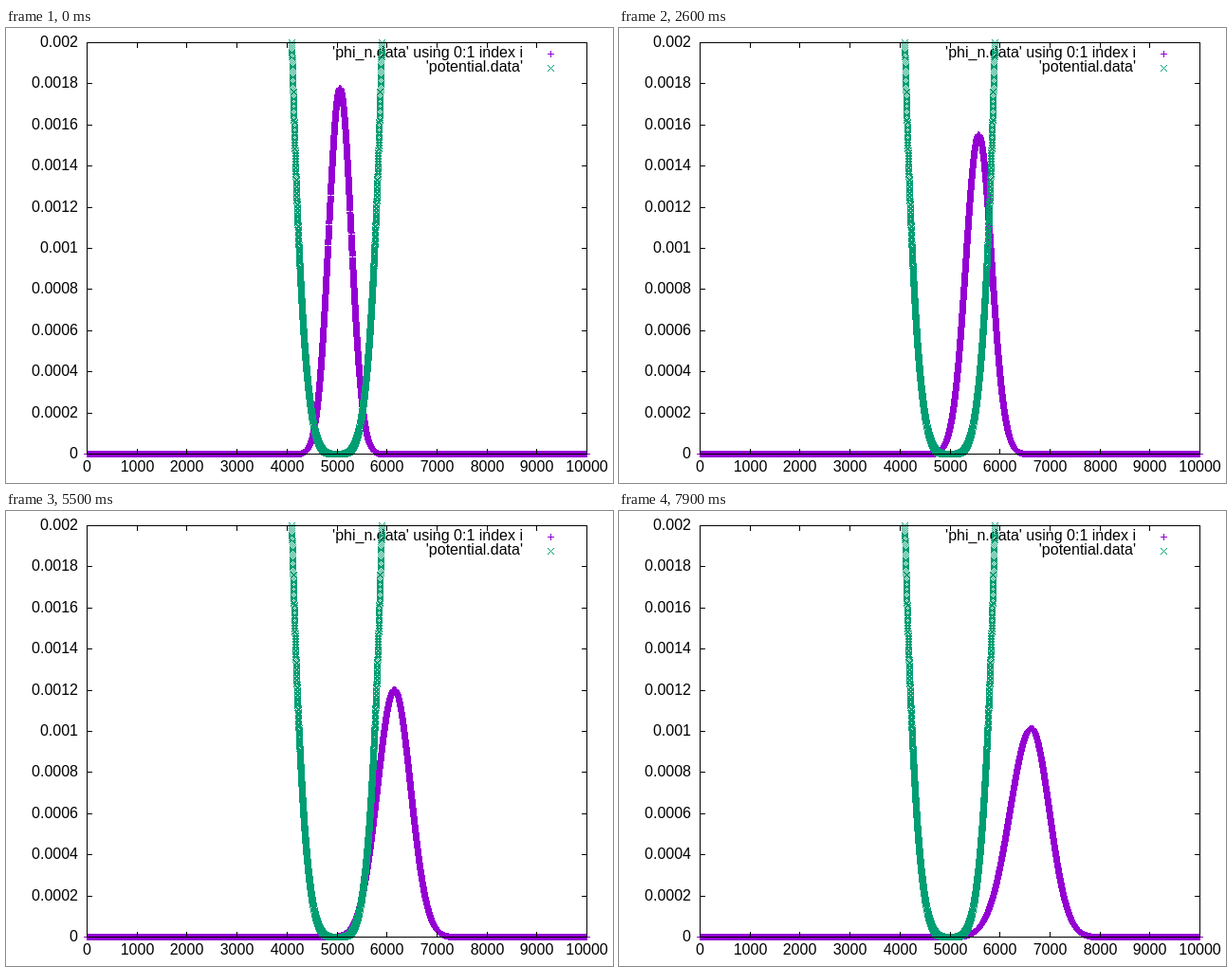
Write an HTML page with a canvas that moves like this. It is 640x480 px and loops after 8000 ms.

```html
<!DOCTYPE html>
<html lang="en">
<head>
<meta charset="utf-8">
<title>Wave packet and potential</title>
<style>
  html, body { margin: 0; width: 100%; height: 100%; overflow: hidden; background: #fff; }
  svg, canvas { position: absolute; left: 0; top: 0; width: 640px; height: 480px; }
  text { font: 16px "Liberation Sans", Arial, sans-serif; fill: #000; }
  rect { shape-rendering: crispEdges; }
</style>
</head>
<body>
<svg viewBox="0 0 640 480">
  <text x="545" y="31" text-anchor="end">'phi_n.data' using 0:1 index i</text>
  <text x="545" y="46" text-anchor="end">'potential.data'</text>
</svg>
<canvas id="plot" width="640" height="480"></canvas>
<svg id="axes" viewBox="0 0 640 480"></svg>
<script>
const LEFT = 85, RIGHT = 612, TOP = 15, BASE = 449;
const COUNT = 10000, HEIGHT = BASE - TOP, SCALE = (RIGHT - LEFT) / COUNT;
const LOOP = 8000, STEP = 100;

// Peak height in pixels every 900 ms, with one extra value at each end.
const PEAKS = [386.8, 386.5, 377.5, 358.5, 334.5, 309.5, 285.5, 263.5, 245.5, 230.5, 218, 208];
const AREA = 4561;

function addAxes() {
  const parts = [];
  const bar = (x, y, w, h) => parts.push(`<rect x="${x}" y="${y}" width="${w}" height="${h}"/>`);
  const label = (x, y, anchor, value) =>
    parts.push(`<text x="${x}" y="${y}" text-anchor="${anchor}">${value}</text>`);
  const width = RIGHT - LEFT + 1, height = HEIGHT + 1;
  bar(LEFT, TOP, width, 1);
  bar(LEFT, BASE, width, 1);
  bar(LEFT, TOP, 1, height);
  bar(RIGHT, TOP, 1, height);
  for (let k = 0; k <= 10; k++) {
    const x = Math.round(LEFT + k * 1000 * SCALE);
    const y = Math.round(BASE - k * HEIGHT / 10);
    bar(x, TOP, 1, 6);
    bar(x, BASE - 5, 1, 6);
    bar(LEFT, y, 6, 1);
    bar(RIGHT - 5, y, 6, 1);
    label(x + 0.5, 468, "middle", k * 1000);
    label(76, y + 5, "end", +(k * 0.0002).toFixed(4));
  }
  document.getElementById("axes").innerHTML = parts.join("");
}

function plus(ctx, x, y) {
  ctx.fillRect(x - 3, y, 7, 1);
  ctx.fillRect(x, y - 3, 1, 7);
}

function cross(ctx, x, y) {
  for (let k = -3; k <= 3; k++) {
    ctx.fillRect(x + k, y + k, 1, 1);
    ctx.fillRect(x + k, y - k, 1, 1);
  }
}

function plotPoints(ctx, mark, from, to, rise) {
  let lastX, lastY;
  for (let i = from; i <= to; i++) {
    const x = Math.round(LEFT + i * SCALE), y = BASE - rise(i);
    if (x !== lastX || y !== lastY) mark(ctx, x, y);
    lastX = x;
    lastY = y;
  }
}

function makePotential() {
  const layer = document.createElement("canvas");
  layer.width = 640;
  layer.height = 480;
  const ctx = layer.getContext("2d");
  ctx.fillStyle = "#009e73";
  cross(ctx, 574, 42);
  plotPoints(ctx, cross, 4100, 5900, i => Math.round(HEIGHT * ((i - 5000) / 900) ** 4));
  return layer;
}

function peakAt(u) {
  const n = Math.floor(u), f = u - n;
  const [a, b, c, d] = PEAKS.slice(n, n + 4);
  return b + f / 2 * (c - a + f * (2 * a - 5 * b + 4 * c - d + f * (3 * (b - c) + d - a)));
}

const ctx = document.getElementById("plot").getContext("2d");
const potential = makePotential();

function draw(ms) {
  const u = ms / 900;
  const peak = peakAt(u);
  const center = 351.7 + 0.01045 * ms;
  const sigma = AREA / peak;
  const skew = 0.06 * (u / 8) ** 3;
  const leftSigma = sigma * (1 + skew), rightSigma = sigma * (1 - skew);

  ctx.clearRect(0, 0, 640, 480);
  ctx.fillStyle = "#9400d3";
  plus(ctx, 574, 27);
  plotPoints(ctx, plus, 0, COUNT, i => {
    const d = LEFT + i * SCALE - center;
    const z = d / (d < 0 ? leftSigma : rightSigma);
    return Math.floor(peak * Math.exp(-z * z / 2));
  });
  ctx.drawImage(potential, 0, 0);
}

let shown = -1;
const start = performance.now();

function tick() {
  const ms = Math.floor((performance.now() - start) % LOOP / STEP) * STEP;
  if (ms !== shown) draw(shown = ms);
  requestAnimationFrame(tick);
}

addAxes();
tick();
</script>
</body>
</html>
```
